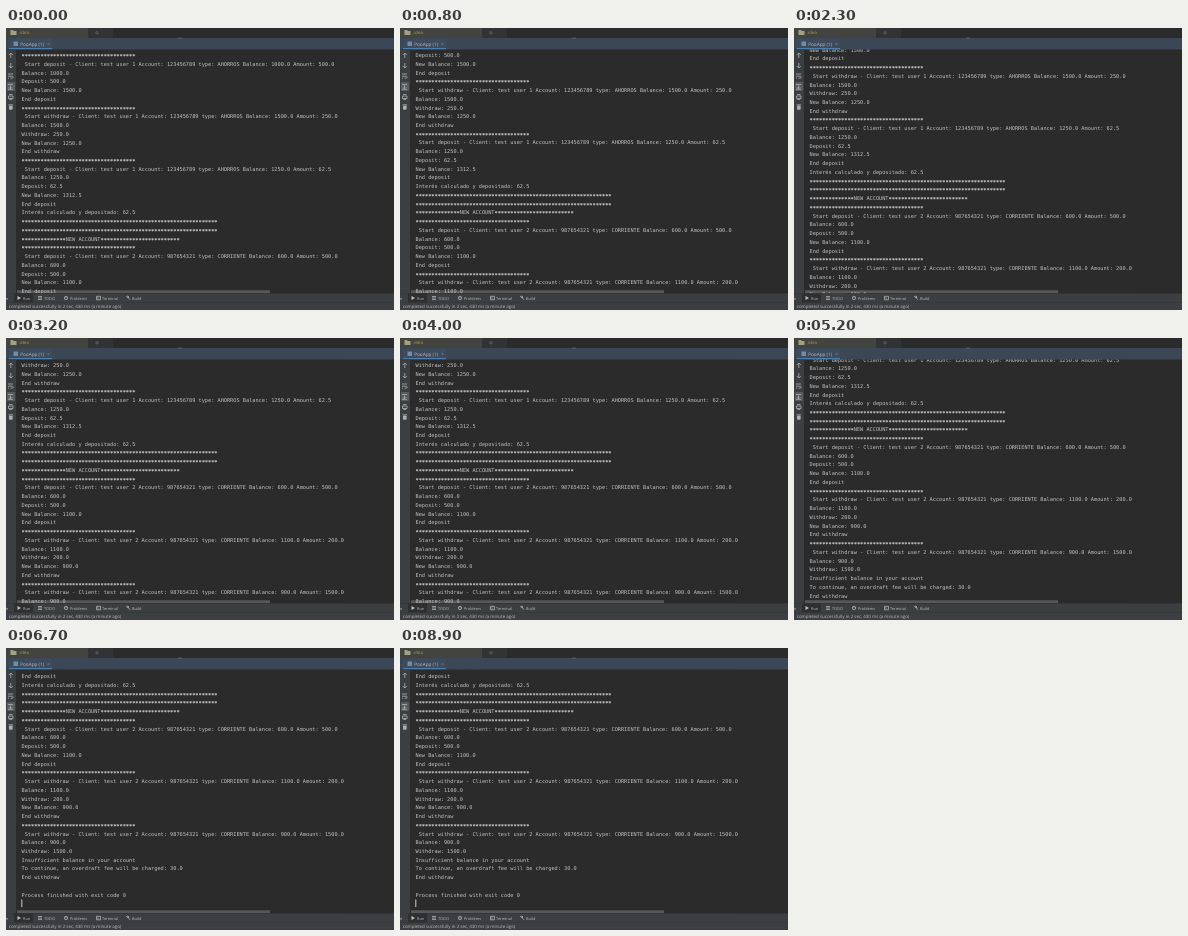
Write an HTML page that moves like this. It is 388x282 px and loops after 9 s.

```html
<!DOCTYPE html>
<html lang="en">
<head>
<meta charset="utf-8">
<title>Console output</title>
<style>
  html, body { margin: 0; width: 100%; height: 100%; overflow: hidden; background: #2b2b2b; }
  svg { display: block; }
  text { text-rendering: geometricPrecision; fill: #bbb; font: 3.9px "Open Sans", "Noto Sans", sans-serif; }
  #log text { fill: #c2c2c2; font: 5.257px "DejaVu Sans Mono", "Noto Sans Mono", monospace; white-space: pre; }
  #log tspan { baseline-shift: -.7px; stroke: #c2c2c2; stroke-width: .2px; }
  .icons { fill: none; stroke: #afb1b3; stroke-width: .8; }
</style>
</head>
<body>
<svg width="388" height="282" viewBox="0 0 388 282">
  <clipPath id="view"><rect x="10" y="21.5" width="378" height="244"/></clipPath>

  <!-- project tree and editor edge -->
  <rect width="388" height="282" fill="#2b2b2b"/>
  <rect width="82" height="10" fill="#43443f"/>
  <rect x="82" width="25" height="10" fill="#313335"/>
  <path d="M4.5 2h2.5l.8 1H10.500v4h-6z" fill="#a3a184"/>
  <text x="13" y="5.8" style="font-size:4.4px;fill:#a5a344">.idea</text>
  <circle class="icons" cx="91" cy="4.800" r="1.200" stroke-opacity=".4"/>

  <!-- tool window header -->
  <rect y="10" width="388" height="11.5" fill="#3b4754"/>
  <rect x="3" y="10.5" width="43" height="10" fill="#3d4b5c"/>
  <rect x="3" y="20" width="43" height="1.2" fill="#4a7fb0"/>
  <rect x="7.500" y="13.5" width="4.5" height="4.5" fill="#6f8ea3"/>
  <text x="14.200" y="17.600" style="font-size:4.7px">PooApp (1)</text>
  <path class="icons" d="M41.5 15l2 2m0-2l-2 2" stroke-opacity=".35"/>
  <path class="icons" d="M172 10h4" stroke-opacity=".4"/>

  <!-- console -->
  <rect x="11" y="262.300" width="253" height="2.700" fill="#585858"/>
  <g clip-path="url(#view)"><g id="log">
    <rect id="caret" x="15.300" y="399" width="1" height="7.5" fill="#ccc"/>
  </g></g>

  <!-- side toolbar -->
  <rect y="21.5" width="10" height="244" fill="#3c3f41"/>
  <rect x="1" y="54" width="8" height="9" rx="1" fill="#585c5f"/>
  <g class="icons">
    <path d="M4.8 30v-5m-2 2l2-2l2 2"/>
    <path d="M4.8 35v5m-2-2l2 2l2-2"/>
    <path d="M2 46h5M2 48.2h4.5q1.5 1 0 2H4.5M2 50.2h1"/>
    <path d="M2 56.5h5M4.5 57.5v3m-1.5-1.2l1.5 1.5l1.500-1.500M2 61.300h5"/>
    <path d="M2.500 68h4.500v2.500h-4.500zM3 66.500h3.500M3.300 71.500h2.800"/>
    <path d="M2.500 76.800h4.600M3.400 78v3.300h2.800V78z" fill="#afb1b3"/>
  </g>

  <!-- tool window bar and status line -->
  <rect y="265.5" width="388" height="16.5" fill="#3c3f41"/>
  <rect x="8" y="265.5" width="19" height="9" fill="#2d2f30"/>
  <rect y="274.5" width="388" height=".5" fill="#323537"/>
  <path d="M11.5 268v4l3.5-2z" fill="#c0c2c4"/>
  <g class="icons">
    <path d="M32 268.5h4M32 270h4M32 271.5h4"/>
    <circle cx="60" cy="270" r="1.7"/><path d="M60 269v1.3"/>
    <path d="M90.5 268.3h4v3.5h-4zM91.5 269.5l1 .7l-1 .7"/>
    <path d="M120.5 268.5l1.5-.5l1 1l-1 1zM122 269.5l2 2.3"/>
  </g>
  <text x="0" y="271.5">e</text>
  <text x="17" y="271.5">Run</text>
  <text x="38" y="271.5">TODO</text>
  <text x="64" y="271.5">Problems</text>
  <text x="96" y="271.5">Terminal</text>
  <text x="126" y="271.5">Build</text>
  <text x="2.8" y="279.7" style="font-size:4.45px">completed successfully in 2 sec, 430 ms (a minute ago)</text>
</svg>
<script>
const PITCH = 8.74, LOOP = 9000, GLIDE = 200, BOTTOM = 147.5;
const log = document.getElementById('log'), caret = document.getElementById('caret');
const stars = n => '*'.repeat(n);

function entry(kind, account, before, amount, after) {
  const user = account === 'AHORROS' ? '1 Account: 123456789' : '2 Account: 987654321';
  const title = kind[0].toUpperCase() + kind.slice(1);
  const result = after ? ['New Balance: ' + after] :
    ['Insufficient balance in your account', 'To continue, an overdraft fee will be charged: 30.0'];
  return [
    stars(36),
    ` Start ${kind} - Client: test user ${user} type: ${account} Balance: ${before} Amount: ${amount}`,
    'Balance: ' + before, `${title}: ${amount}`, ...result, 'End ' + kind
  ];
}

const lines = [
  ...entry('deposit', 'AHORROS', '1000.0', '500.0', '1500.0'),
  ...entry('withdraw', 'AHORROS', '1500.0', '250.0', '1250.0'),
  ...entry('deposit', 'AHORROS', '1250.0', '62.5', '1312.5'),
  'Interés calculado y depositado: 62.5',
  stars(62), stars(62), stars(14) + 'NEW ACCOUNT' + stars(25),
  ...entry('deposit', 'CORRIENTE', '600.0', '500.0', '1100.0'),
  ...entry('withdraw', 'CORRIENTE', '1100.0', '200.0', '900.0'),
  ...entry('withdraw', 'CORRIENTE', '900.0', '1500.0'),
  '', 'Process finished with exit code 0'
];
lines.forEach((line, i) => {
  const row = document.createElementNS('http://www.w3.org/2000/svg', 'text');
  row.setAttribute('x', 15.5);
  row.setAttribute('y', 29.1 + i * PITCH);
  row.innerHTML = line.replace(/ /g, '\u00a0').replace(/\*+/g, '<tspan>$&</tspan>');
  log.append(row);
});

// Each wheel notch glides three lines, up to the end of the log.
const notches = [600, 2192, 2800, 4100, 5092, 5650];
function scrollAt(t) {
  const turns = notches.reduce((sum, at) => sum + Math.min(1, Math.max(0, (t - at) / GLIDE)), 0);
  return Math.min(BOTTOM, turns * 3 * PITCH);
}

function draw(now) {
  const t = now % LOOP;
  log.setAttribute('transform', `translate(0 ${-scrollAt(t)})`);
  caret.setAttribute('visibility', t % 1000 >= 500 ? 'visible' : 'hidden');
  requestAnimationFrame(draw);
}
draw(performance.now());
</script>
</body>
</html>
```
